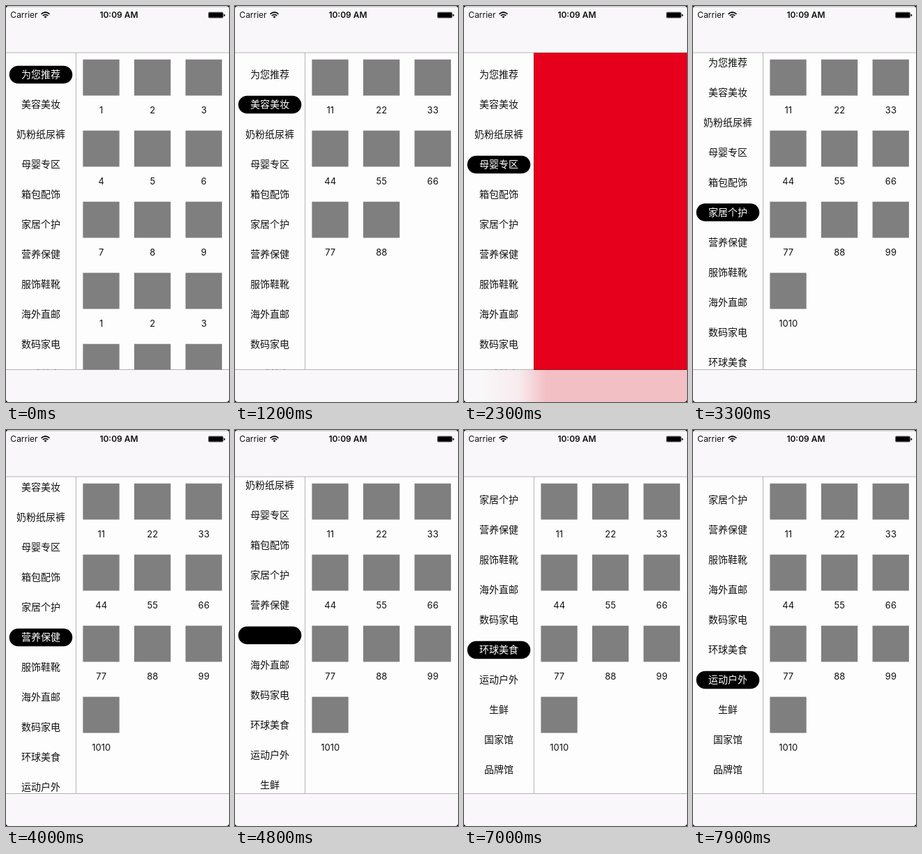
Animation, 320 px wide and 568 px high, one loop 8 s. Source, as an HTML page:

```html
<!DOCTYPE html>
<html lang="zh">
<head>
<meta charset="utf-8">
<title>Category list</title>
<style>
  html, body { margin: 0; width: 100%; height: 100%; overflow: hidden; background: #fff; }
  svg { display: block; width: 320px; height: 568px; }
  text { font: 13px Inter, sans-serif; fill: #111; text-anchor: middle; }
  .item { font: 14px "Noto Sans CJK SC", "Noto Sans CJK", sans-serif; }
  .item.on { fill: #fff; }
  .item.dim { fill: #000; }
  .status { font-size: 12px; }
  .time { font-weight: 600; }
  .rule { stroke: #000; stroke-opacity: .28; }
</style>
</head>
<body>
<svg id="stage" viewBox="0 0 320 568">
  <defs>
    <clipPath id="body"><rect y="67" width="320" height="454.5"/></clipPath>
    <linearGradient id="tint">
      <stop offset=".08" stop-color="#f2bfc5" stop-opacity="0"/>
      <stop offset=".25" stop-color="#f2bfc5" stop-opacity=".22"/>
      <stop offset=".37" stop-color="#f2bfc5"/>
    </linearGradient>
  </defs>
  <rect width="320" height="568" fill="#fefdfe"/>
  <rect width="320" height="67" fill="#f9f7f9"/>
  <rect y="521" width="320" height="47" fill="#f9f7f9"/>
  <rect id="glow" y="522" width="320" height="46" fill="url(#tint)"/>
  <g clip-path="url(#body)">
    <g id="grid"></g>
    <g id="list"><rect id="pill" x="4.7" width="90.6" height="25.6" rx="12.8"/></g>
  </g>
  <rect id="red" x="100" y="67" width="220" height="455" fill="#e6001b"/>
  <path class="rule" d="M100.5 67V521M0 67H320M0 521.5H320"/>
  <path d="M0 1H320" stroke="#d2d2d4" stroke-width="2"/>
  <path d="M0 0H4Q0 0 0 4ZM320 0H316Q320 0 320 4ZM0 568H4Q0 568 0 564ZM320 568H316Q320 568 320 564Z"/>
  <text class="status" x="26" y="17.3">Carrier</text>
  <text class="status time" x="162" y="17.3">10:09 AM</text>
  <g fill="none" stroke="#111" stroke-width="1.7">
    <path d="M50.5 11.6Q56.5 6.4 62.5 11.6M52.7 13.9Q56.5 10.7 60.3 13.9"/>
    <path d="M54.4 15.2Q56.5 13.6 58.6 15.2L56.5 17.4Z" fill="#111" stroke="none"/>
  </g>
  <rect x="290" y="8.5" width="22" height="9" rx="2" fill="#777"/>
  <rect x="291" y="9.5" width="20" height="7" rx="1"/>
  <path d="M312.5 11.3q1.8 .3 1.8 1.9t-1.8 1.9z"/>
</svg>
<script>
const LOOP = 8000, PITCH = 43, MID = 294, MAX_SCROLL = 213, GLIDE = 340;
const names = ("为您推荐 美容美妆 奶粉纸尿裤 母婴专区 箱包配饰 家居个护 营养保健 服饰鞋靴 " +
  "海外直邮 数码家电 环球美食 运动户外 生鲜 国家馆 品牌馆").split(" ");
// Time at which each category becomes selected
const taps = [0, 700, 1300, 1900, 2600, 3105, 3800, 4350, 4900, 6000, 6650, 7250];
const RED = 3;
const dimFrom = 4800, dimTo = 4900;

const $ = id => document.getElementById(id);
function add(parent, tag, attrs, label) {
  const el = document.createElementNS("http://www.w3.org/2000/svg", tag);
  for (const key in attrs) el.setAttribute(key, attrs[key]);
  if (label) el.textContent = label;
  parent.append(el);
  return el;
}

const items = names.map((name, i) =>
  add($("list"), "text", { class: "item", x: 50, y: 103.4 + i * PITCH }, name));

const cells = Array.from({ length: 15 }, (_, i) => {
  const x = 110.4 + (i % 3) * 73.6, y = 76.7 + Math.floor(i / 3) * 102;
  const cell = add($("grid"), "g", {});
  add(cell, "rect", { x, y, width: 52.3, height: 51.8, fill: "#807f80" });
  return { cell, label: add(cell, "text", { x: x + 26.3, y: y + 77 }) };
});

const show = (el, on) => el.setAttribute("visibility", on ? "visible" : "hidden");
const target = i => Math.min(MAX_SCROLL, Math.max(0, 98 + i * PITCH - MID));

function scrollAt(sel, t) {
  const from = target(Math.max(0, sel - 1));
  const p = Math.min(1, (t - taps[sel]) / GLIDE);
  return from + (target(sel) - from) * (1 - (1 - p) ** 3);
}

let current = -1;
function select(sel) {
  current = sel;
  $("pill").setAttribute("y", 85.7 + sel * PITCH);
  items.forEach((el, i) => el.classList.toggle("on", i === sel));
  show($("red"), sel === RED);
  show($("glow"), sel === RED);
  const count = [15, 8][sel] || 10;
  cells.forEach(({ cell, label }, i) => {
    show(cell, i < count);
    label.textContent = sel ? `${i + 1}${i + 1}` : i % 9 + 1;
  });
}

function render(t) {
  const sel = taps.findLastIndex(start => start <= t);
  if (sel !== current) select(sel);
  items[7].classList.toggle("dim", t >= dimFrom && t < dimTo);
  $("list").setAttribute("transform", `translate(0 ${-scrollAt(sel, t)})`);
}

const began = performance.now();
function tick() {
  render((performance.now() - began) % LOOP);
  requestAnimationFrame(tick);
}
tick();
</script>
</body>
</html>
```
